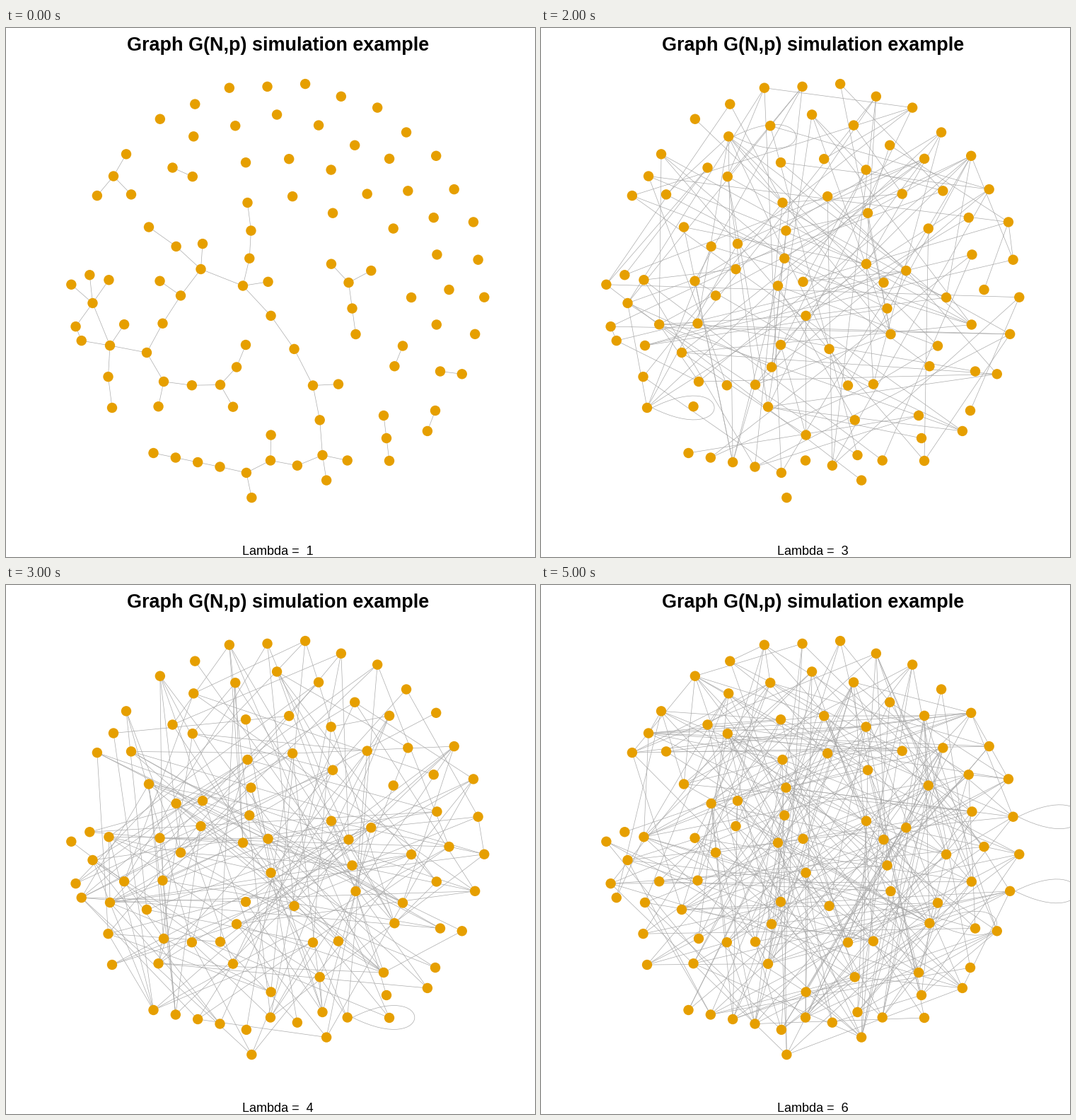
A matplotlib script that plays this animation: 748x748 px, repeating every 6 s.

```python
import math
import random

import matplotlib.pyplot as plt
import numpy as np
from matplotlib.animation import FuncAnimation
from matplotlib.collections import PathCollection
from matplotlib.path import Path

SIZE, DPI = 748, 100
PT = 72 / DPI            # points per pixel
CX, CY = 384.5, 368.5    # middle of the layout
UNIT = 293               # pixels per layout unit
RADIUS = 7.2

nodes, forest = [], []


def add(x, y, parent=None):
    nodes.append((x, y))
    if parent is not None:
        forest.append((parent, len(nodes) - 1))
    return len(nodes) - 1


def branch(start, n, end, bend=0):
    """Grow n evenly spaced nodes to end, bowed sideways by bend pixels."""
    (x, y), node = nodes[start], start
    dx, dy = end[0] - x, end[1] - y
    length = math.hypot(dx, dy)
    for t in np.linspace(0, 1, n + 1)[1:]:
        bow = 4 * t * (1 - t) * bend / length
        node = add(x + t * dx + bow * dy, y + t * dy - bow * dx, node)
    return node


def leaves(node, *angles, length=36):
    x, y = nodes[node]
    for a in np.radians(angles):
        add(x + length * math.cos(a), y - length * math.sin(a), node)
    return len(nodes) - 1


def pair(x, y, angle):
    return leaves(add(x, y), angle, length=31)


def arc(n, first, last, r, wobble=0):
    """Lone nodes around the middle, alternately pushed out and in."""
    ids = []
    for i, a in enumerate(np.radians(np.linspace(first, last, n))):
        ri = r + wobble * (-1) ** i
        ids.append(add(CX + ri * math.cos(a), CY - ri * math.sin(a)))
    return ids


# Giant component: right limb and bottom row
hub = add(335, 364.5)
leaves(hub, 9)
branch(hub, 3, (341.5, 247), -8)
elbow = branch(hub, 3, (434, 505.5), 9)
leaves(elbow, 3)
foot = branch(elbow, 2, (447.5, 604), 3)
right_toe = leaves(foot, -81, -12)
row = branch(foot, 2, (374, 611.5), 11)
leaves(row, 89)
low = branch(row, 2, (302.5, 620.5), 13)
leaves(low - 1, -78)
branch(low, 3, (208.5, 601))

# Giant component: left limb
fork = branch(hub, 1, (275.5, 341))
leaves(fork, 86)
branch(fork, 2, (202, 281.5), -3)
knot = branch(fork, 3, (199, 459), -4)
leaves(knot - 2, 145)
dip = branch(knot, 1, (223, 500))
leaves(dip, -102)
bow_end = branch(dip, 2, (303, 504.5), -3)
leaves(bow_end, -60)
branch(bow_end, 2, (339, 448), -6)
west = branch(knot, 1, (147, 449))
leaves(west, 56)
southwest = branch(west, 2, (150, 537), -4)
star = branch(west, 3, (122.5, 389), 39)
forest.append((star, west))
leaves(star, 139, 96, 55, length=40)

# Small components
leaves(add(152, 209.5), 60, 230, -46)
tee = add(484.5, 360)
leaves(tee, 133, 28)
branch(tee, 2, (494.5, 433))
branch(add(534, 548), 2, (542, 612))
pair(235.5, 197.5, -24)
slant = pair(561, 449.5, -112)
flat = pair(614, 485.5, -7)
pair(607, 541, -111)

# Isolated nodes, from the outside in
rim = arc(14, 124.8, -13, 289, 3)
inner = arc(4, 119, 76, 242, 4)
arc(7, 61.8, -12.8, 236, -6)
arc(5, 104.3, 27.5, 184)
arc(1, -3.8, -3.8, 189)
arc(2, 81, 54, 132)

LOOPS = {2: [west], 3: [southwest, inner[0]], 4: [right_toe],
         5: [flat - 1], 6: [rim[11], rim[13], slant]}


def random_edges(lam):
    rng = random.Random(lam)
    edges = set()
    while len(edges) < 50 * lam:
        edges.add(tuple(sorted(rng.sample(range(len(nodes)), 2))))
    return sorted(edges)


def loop_path(node):
    x, y = nodes[node]
    x += RADIUS
    far, rise = x + 0.4 * UNIT, 0.2 * UNIT
    return Path([(x, y), (far, y - rise), (far, y + rise), (x, y)],
                [Path.MOVETO] + [Path.CURVE4] * 3)


def graph_paths(lam):
    edges = forest if lam == 1 else random_edges(lam)
    lines = [Path([nodes[a], nodes[b]]) for a, b in edges]
    return lines + [loop_path(n) for n in LOOPS.get(lam, [])]


graphs = [graph_paths(lam) for lam in range(1, 7)]

fig = plt.figure(figsize=(SIZE / DPI, SIZE / DPI), dpi=DPI, facecolor="white")
ax = fig.add_axes([0, 0, 1, 1])
ax.set_xlim(0, SIZE)
ax.set_ylim(SIZE, 0)
ax.axis("off")

links = PathCollection(graphs[0], facecolors="none", edgecolors="#A9A9A9",
                       linewidths=0.68 * PT, zorder=1)
dots = PathCollection([Path.circle(p, RADIUS) for p in nodes],
                      facecolors="#E69F00", linewidths=0, zorder=2)
for layer in (links, dots):
    ax.add_collection(layer, autolim=False)


def label(y, text, px, **kw):
    return ax.text(CX, y, text, fontsize=px * PT, ha="center",
                   va="baseline", family="Liberation Sans", **kw)


label(32, "Graph G(N,p) simulation example", 27, weight="bold")
caption = label(745, "", 18)


def update(i):
    links.set_paths(graphs[i])
    caption.set_text(f"Lambda =  {i + 1}")
    return links, caption


anim = FuncAnimation(fig, update, frames=6, interval=1000, repeat=True,
                     repeat_delay=0, blit=False)
plt.show()
```
